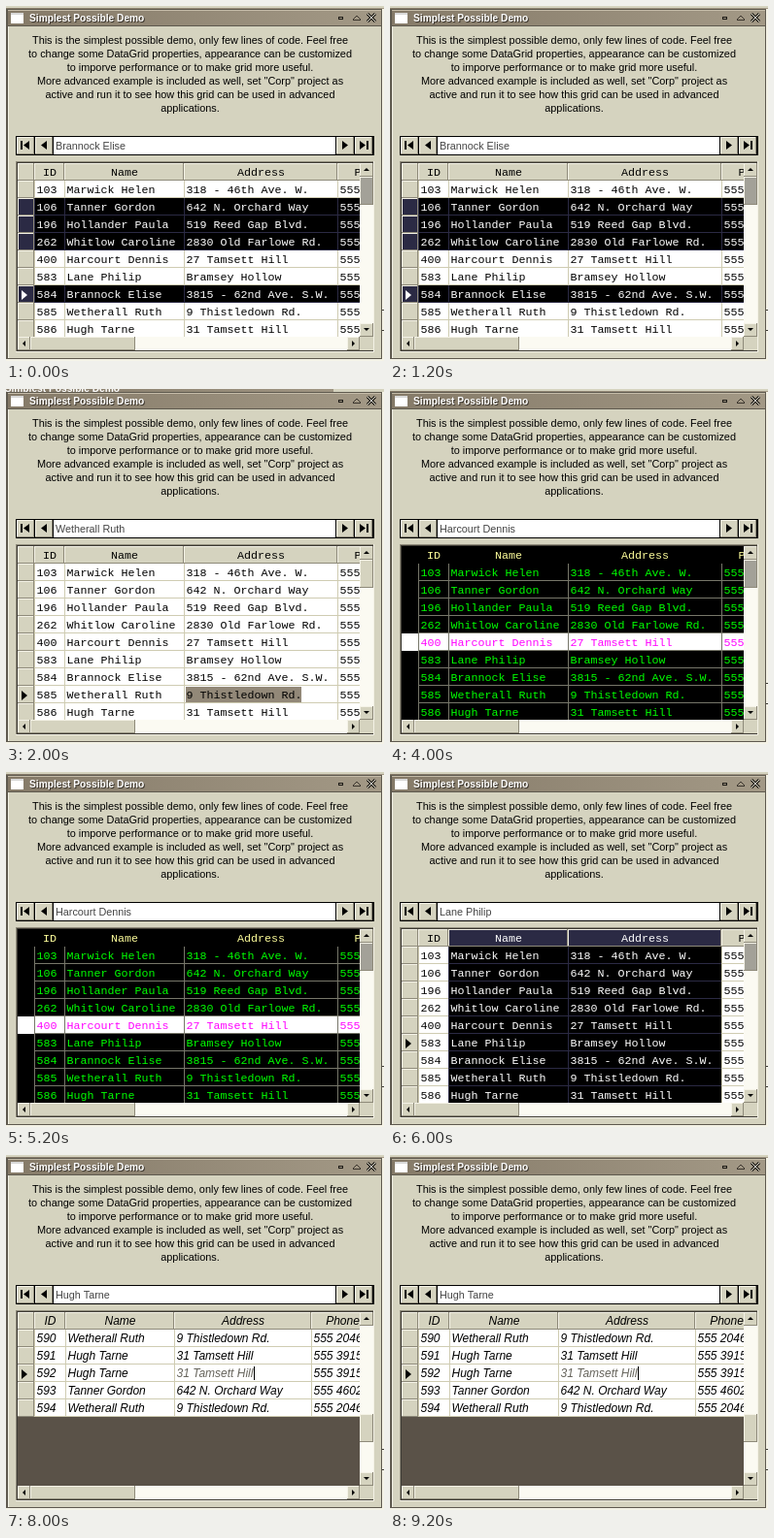
An HTML page with a canvas for the animation above (10000 ms loop, 389 by 366 pixels).

```html
<!DOCTYPE html>
<html lang="en">
<head>
<meta charset="utf-8">
<title>Simplest Possible Demo</title>
<style>
html, body { margin: 0; width: 389px; height: 366px; overflow: hidden; }
canvas { display: block; }
</style>
</head>
<body>
<canvas id="stage" width="389" height="366"></canvas>
<script>
const ctx = document.getElementById('stage').getContext('2d');

const FACE = '#d5d3bf', DARK = '#5a5248', SHADE = '#8e8a7a', LIGHT = '#f4f2e6';
const NAVY = '#2b2a44', LINE = '#cfccb2', TROUGH = '#fbfaf2', EDGE = '#5e594e';
const SANS = '"Liberation Sans", Arial, sans-serif';
const MONO = '11.67px "Liberation Mono", "Courier New", monospace';
const ROW = 18, TOP = 181, LEFT = 12, RIGHT = 364, BOTTOM = 341;
const SCENE_MS = 2000;

const people = {
  marwick: ['Marwick Helen', '318 - 46th Ave. W.', '555 4410'],
  tanner: ['Tanner Gordon', '642 N. Orchard Way', '555 4602'],
  hollander: ['Hollander Paula', '519 Reed Gap Blvd.', '555 5127'],
  whitlow: ['Whitlow Caroline', '2830 Old Farlowe Rd.', '555 2290'],
  harcourt: ['Harcourt Dennis', '27 Tamsett Hill', '555 3301'],
  lane: ['Lane Philip', 'Bramsey Hollow', '555 8054'],
  brannock: ['Brannock Elise', '3815 - 62nd Ave. S.W.', '555 9436'],
  wetherall: ['Wetherall Ruth', '9 Thistledown Rd.', '555 2046'],
  tarne: ['Hugh Tarne', '31 Tamsett Hill', '555 3915']
};
const record = ([id, key]) => [String(id), ...people[key]];

const firstPage = [
  [103, 'marwick'], [106, 'tanner'], [196, 'hollander'], [262, 'whitlow'],
  [400, 'harcourt'], [583, 'lane'], [584, 'brannock'], [585, 'wetherall'],
  [586, 'tarne']
].map(record);
const lastPage = [
  [590, 'wetherall'], [591, 'tarne'], [592, 'tarne'], [593, 'tanner'],
  [594, 'wetherall']
].map(record);

const monoCols = [29, 60, 183, 341, 410];
const italicCols = [29, 61, 173, 314, 378];
const heads = ['ID', 'Name', 'Address', 'Phone'];

const intro = [
  'This is the simplest possible demo, only few lines of code. Feel free',
  'to change some DataGrid properties, appearance can be customized',
  'to imporve performance or to make grid more useful.',
  'More advanced example is included as well, set "Corp" project as',
  'active and run it to see how this grid can be used in advanced',
  'applications.'
];

const scenes = [
  { rows: firstPage, current: 6, picked: [1, 2, 3, 6], thumb: 177, held: true, edge: 313 },
  { rows: firstPage, current: 7, edit: 'select', thumb: 177, behind: true },
  { rows: firstPage, current: 4, night: true, thumb: 177, held: true, edge: 303 },
  { rows: firstPage, current: 5, pickedCols: [1, 2], thumb: 177, held: true, edge: 303 },
  { rows: lastPage, current: 2, edit: 'caret', italic: true, thumb: 268, edge: 303 }
];

function rect(x, y, w, h, color) {
  ctx.fillStyle = color;
  ctx.fillRect(x, y, w, h);
}

function text(str, x, y, font, color, align = 'left') {
  ctx.font = font;
  ctx.fillStyle = color;
  ctx.textAlign = align;
  ctx.fillText(str, x, y);
}

function poly(color, ...pts) {
  ctx.fillStyle = color;
  ctx.beginPath();
  for (let i = 0; i < pts.length; i += 2) ctx.lineTo(pts[i], pts[i + 1]);
  ctx.fill();
}

function stroke(color, width, ...pts) {
  ctx.strokeStyle = color;
  ctx.lineWidth = width;
  ctx.beginPath();
  for (let i = 0; i < pts.length; i += 4) {
    ctx.moveTo(pts[i], pts[i + 1]);
    ctx.lineTo(pts[i + 2], pts[i + 3]);
  }
  ctx.stroke();
}

function bevel(x, y, w, h, fill = FACE) {
  rect(x, y, w, h, SHADE);
  rect(x, y, w - 1, h - 1, LIGHT);
  rect(x + 1, y + 1, w - 2, h - 2, fill);
}

function clip(x, y, w, h, draw) {
  ctx.save();
  ctx.beginPath();
  ctx.rect(x, y, w, h);
  ctx.clip();
  draw();
  ctx.restore();
}

function drawTitle(scene) {
  const bold = 'bold 10.2px ' + SANS;
  const title = 'Simplest Possible Demo';
  const bar = ctx.createLinearGradient(0, 0, 389, 0);
  bar.addColorStop(0, '#857a68');
  bar.addColorStop(1, '#a39986');
  rect(0, 0, 389, 21, bar);
  if (scene.behind) {
    clip(0, 0, 389, 4, () => text(title, 117, 3, bold, '#fff', 'right'));
    rect(337, 0, 52, 3, FACE);
  } else {
    rect(0, 0, 389, 2, FACE);
  }
  rect(0, 3, 389, 1, EDGE);
  rect(0, 4, 389, 1, '#c4bba8');
  rect(0, 20, 389, 1, EDGE);
  rect(5, 7, 13, 11, '#fff');
  rect(5, 7, 13, 2, '#d8d8d8');
  text(title, 25, 17, bold, '#3c362e');
  text(title, 24, 16, bold, '#fff');
  ctx.strokeStyle = '#1c1a16';
  ctx.lineWidth = 1;
  ctx.strokeRect(342.5, 11.5, 4, 2);
  stroke('#3c362e', 1, 357, 14, 361, 10, 361, 10, 365, 14, 357, 14.5, 365, 14.5);
  stroke('#1c1a16', 3, 372, 8, 380, 16, 380, 8, 372, 16);
  stroke('#e8e4d4', 1, 372, 8, 380, 16, 380, 8, 372, 16);
}

function drawWindow(scene) {
  rect(0, 0, 389, 366, FACE);
  drawTitle(scene);
  rect(0, 3, 2, 361, EDGE);
  rect(2, 21, 1, 342, LIGHT);
  rect(386, 3, 1, 361, EDGE);
  rect(387, 3, 2, 363, LIGHT);
  rect(0, 363, 387, 1, EDGE);
  rect(0, 364, 389, 2, LIGHT);
  if (scene.edge) {
    rect(387, scene.edge, 2, 1, '#3c3a34');
    rect(387, scene.edge + 21, 2, 1, '#3c3a34');
  }
  intro.forEach((line, i) =>
    text(line, 189.5, 39 + 14 * i, '10.9px ' + SANS, '#000', 'center'));
}

function drawNavigator(scene) {
  rect(10, 134, 369, 20, '#000');
  for (const x of [11, 30, 340, 359]) bevel(x, 135, 18, 18);
  rect(49, 135, 290, 18, '#fff');
  rect(15, 139, 2, 9, '#000');
  poly('#000', 24, 139, 24, 148, 18, 143.5);
  poly('#000', 42, 139, 42, 148, 36, 143.5);
  poly('#000', 346, 139, 346, 148, 352, 143.5);
  poly('#000', 364, 139, 364, 148, 370, 143.5);
  rect(371, 139, 2, 9, '#000');
  text(scene.rows[scene.current][1], 51, 148, '10.8px ' + SANS, '#444');
}

function drawScrollbars(scene) {
  rect(364, 163, 14, 179, TROUGH);
  bevel(364, 163, 14, 14);
  bevel(364, 328, 14, 14);
  bevel(364, scene.thumb, 14, 29, scene.held ? '#a3a198' : FACE);
  poly('#000', 368, 171, 374, 171, 371, 168);
  poly('#000', 368, 333, 374, 333, 371, 336);
  rect(12, 342, 366, 14, FACE);
  rect(12, 342, 352, 14, TROUGH);
  bevel(12, 342, 13, 14);
  bevel(25, 342, 108, 14);
  bevel(351, 342, 13, 14);
  poly('#000', 20, 346, 20, 352, 17, 349);
  poly('#000', 356, 346, 356, 352, 359, 349);
}

function drawHeader(scene, cols, font) {
  if (scene.night) rect(LEFT, 163, 352, ROW, '#000');
  else bevel(LEFT, 163, 17, ROW);
  heads.forEach((head, c) => {
    const x = cols[c], w = cols[c + 1] - x;
    const on = scene.pickedCols && scene.pickedCols.includes(c);
    if (!scene.night) bevel(x, 163, w, ROW, on ? NAVY : FACE);
    const ink = scene.night ? '#ffff9c' : on ? '#fff' : '#000';
    text(head, x + w / 2 + 0.5, 176, font, ink, 'center');
  });
}

function drawRow(scene, cols, font, row, r) {
  const y = TOP + ROW * r, now = r === scene.current;
  const picked = scene.picked && scene.picked.includes(r);
  const night = scene.night;
  if (night) rect(LEFT, y, 17, ROW, now ? '#fff' : '#000');
  else bevel(LEFT, y, 17, ROW, picked ? NAVY : FACE);
  if (now && !night) {
    poly(picked ? '#fff' : '#000', 16, y + 5, 16, y + 15, 22, y + 10);
  }
  row.forEach((value, c) => {
    const x = cols[c], w = cols[c + 1] - x;
    const black = picked || (scene.pickedCols && scene.pickedCols.includes(c));
    const fill = black || (night && !now) ? '#000' : '#fff';
    const rule = night ? '#77776a' : black ? NAVY : LINE;
    const editing = now && c === 2 && scene.edit;
    let ink = black ? '#fff' : '#000';
    if (night) ink = now ? '#f0f' : '#0f0';
    if (editing === 'caret') ink = '#66645c';
    rect(x, y, w, ROW, fill);
    rect(x, y, 1, ROW, rule);
    rect(x, y + ROW - 1, w, 1, rule);
    if (editing === 'select') rect(185, y + 1, 119, ROW - 2, '#928878');
    text(value, x + 2.5, y + 13, font, ink);
    if (editing === 'caret') {
      rect(Math.round(x + 3 + ctx.measureText(value).width), y + 2, 1, 14, '#000');
    }
  });
}

function drawGrid(scene) {
  const cols = scene.italic ? italicCols : monoCols;
  const font = scene.italic ? 'italic 12px ' + SANS : MONO;
  ctx.save();
  ctx.translate(0, -1);
  rect(10, 161, 369, 197, LIGHT);
  rect(10, 161, 368, 196, SHADE);
  rect(11, 162, 367, 195, '#3e3b34');
  clip(LEFT, 163, RIGHT - LEFT, BOTTOM - 162, () => {
    rect(LEFT, 163, 352, 179, DARK);
    drawHeader(scene, cols, font);
    scene.rows.forEach((row, r) => drawRow(scene, cols, font, row, r));
  });
  drawScrollbars(scene);
  ctx.restore();
}

function draw(time) {
  const scene = scenes[Math.floor(time / SCENE_MS) % scenes.length];
  drawWindow(scene);
  drawNavigator(scene);
  drawGrid(scene);
}

const start = performance.now();
function tick() {
  draw(performance.now() - start);
  requestAnimationFrame(tick);
}
tick();
</script>
</body>
</html>
```
